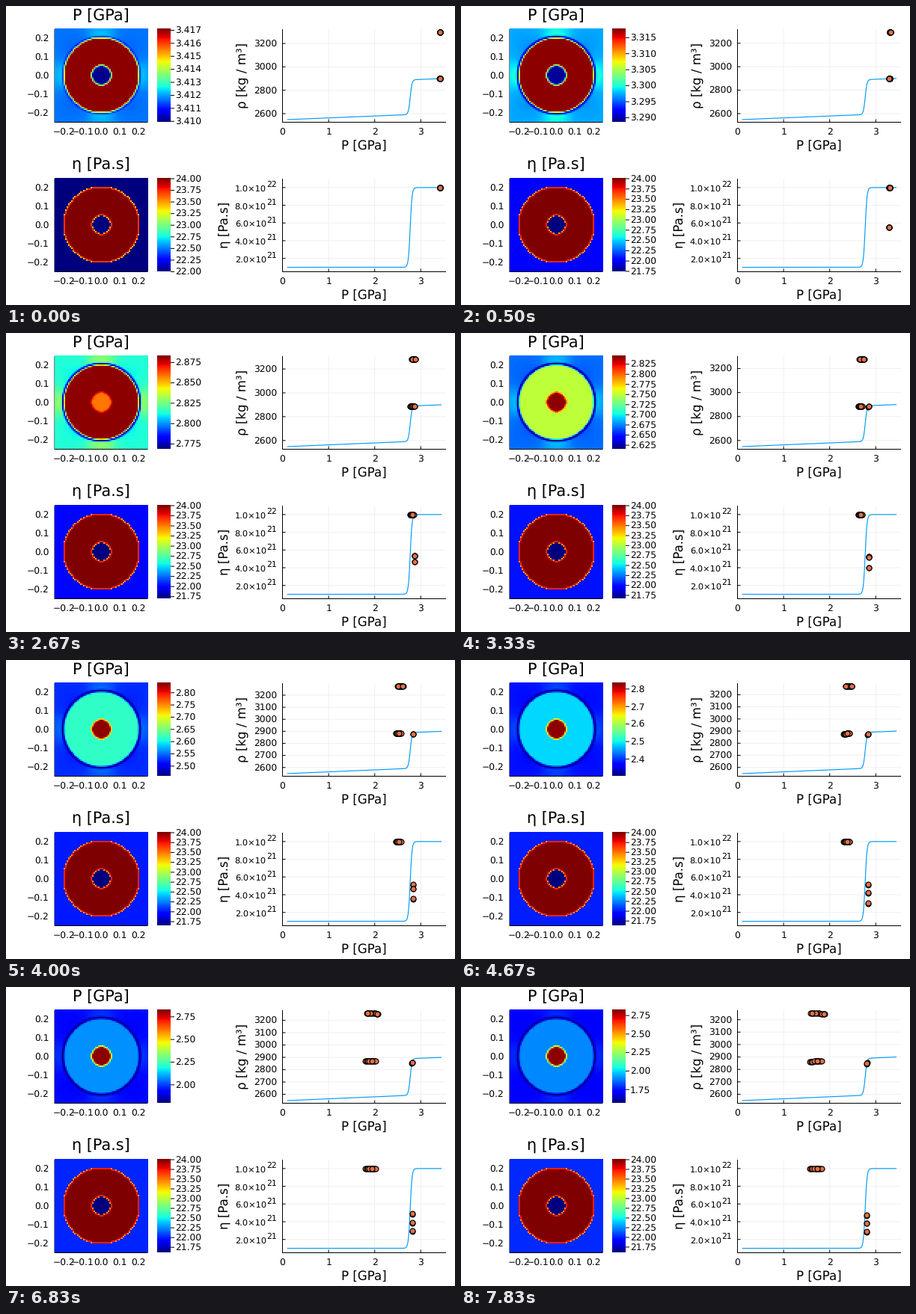
Write a matplotlib script that moves like this. It is 600x400 px and loops after 8 s.

```python
import math
import numpy as np
import matplotlib
import matplotlib.pyplot as plt
from matplotlib.animation import FuncAnimation

matplotlib.rcParams["font.family"] = "DejaVu Sans"
matplotlib.rcParams["text.hinting"] = "none"

W, H = 600, 400
STEPS, SUB = 48, 5              # simulation steps, drawn frames per step
PX = 0.72                       # points per pixel at 100 dpi
SIDE = 124.5                    # panel height
TICK, GUIDE, TITLE = 12.2, 16.6, 20.8
BLUE, ORANGE, GRID = "#009afa", "#e26f46", "#f0f0f0"

# Values over time, in GPa unless noted
KEYS = [0, 3, 11, 20, 28, 36, 47]
P_MIN = [3.40993, 3.2886, 2.9605, 2.615, 2.302, 1.99, 1.565]
P_RING = [3.41700, 3.3173, 3.0480, 2.748, 2.481, 2.225, 1.89]
P_MATRIX = [3.41170, 3.2973, 2.996, 2.67, 2.38, 2.11, 1.73]
LOBE = [0.0004, 0.0022, 0.010, 0.014, 0.021, 0.029, 0.038]
RIM = [0.4, 0.9, 0.8, 1, 1, 1, 1]
RING_LOW = [0.4, 0.4, 0.4, 0.22, 0.2, 0.12, 0.06]
CORE_KEYS = [0, 3, 11, 13, 15, 20, 28, 36, 47]
P_CORE = [3.41002, 3.2893, 2.967, 2.893, 2.862, 2.842, 2.827, 2.814, 2.807]
ETA_MIN = [21.74, 21.74, 21.74, 21.665, 21.63, 21.615, 21.605]   # log10
ETA_CORE = [                                                       # 1e21 Pa.s
    [5.5, 5.5, 5.5, 5.25, 5.18, 5.0, 4.78],
    [5.5, 5.5, 5.5, 5.18, 4.25, 4.0, 3.87],
    [5.5, 5.5, 5.5, 4.0, 3.1, 3.0, 2.9],
]

# Grid geometry
N = 62
CELL = 0.5 / N
mid = (np.arange(N) + 0.5) * CELL - 0.25
X, Y = np.meshgrid(mid, mid)
R = np.hypot(X, Y)


def cover(radius):
    """Share of each cell's four corners that lie inside a circle."""
    offs = (-CELL / 2, CELL / 2)
    return sum(np.hypot(X + a, Y + b) < radius for a in offs for b in offs) / 4


OUTER, INNER = cover(0.2), cover(0.05)
quad = np.cos(4 * np.arctan2(Y, X)) * (0.2 / R) ** 3
PATTERN = np.where(quad > 0, 1.6 * quad, 0.5 * quad)
DIP = np.exp(-((R - 0.206) / 0.006) ** 2)
ORDER = np.random.default_rng(4).permutation(15)


def at(k, vals, keys=KEYS):
    return float(np.interp(k, keys, vals))


def jump(p):
    return 0.5 * (1 + np.tanh((p - 2.77) / 0.04))


def density(p):
    s = jump(p)
    return (1 - s) * (2547.5 + 16 * p) + s * (2848 + 15 * p)


def px(p):
    return 369.5 + 61.6 * np.asarray(p)


def eta_y(v):
    return 355.5 - (np.asarray(v) - 0.5) * SIDE / 10.5


fig = plt.figure(figsize=(W / 100, H / 100), dpi=100, facecolor="white")
ax = fig.add_axes([0, 0, 1, 1])
ax.set_axis_off()
moving = []
CURVE_P = np.linspace(0.1, 3.45, 300)


def text(x, y, s, size=TICK, ha="center", **kw):
    return ax.text(x, y, s, fontsize=size * PX, ha=ha, va="baseline", color="black", **kw)


def line(xs, ys, color="black", width=1.0, z=3):
    return ax.plot(xs, ys, color=color, lw=width * PX, zorder=z,
                   solid_capstyle="butt", snap=False)[0]


def picture(data, x0, x1, top):
    im = ax.imshow(data, extent=[x0, x1, top + SIDE, top], cmap="jet", origin="upper",
                   interpolation="nearest", aspect="auto", zorder=2)
    im.set_clim(0, 1)
    return im


def side_label(x, y, s):
    return text(x, y + 4.6, s, ha="right")


def y_tick(y):
    return [line([369.5, 588], [y, y], GRID, z=1), line([369.5, 373.5], [y, y])]


def draw_static():
    maps = []
    for top, title in ((31, "P [GPa]"), (231, "η [Pa.s]")):
        bottom = top + SIDE
        text(127.2, top - 12, title, TITLE)
        # map panel
        line([65, 65, 189.5], [top, bottom, bottom], z=1)
        maps.append(picture(np.zeros((N, N)), 65, 189.5, top))
        picture(np.linspace(1, 0, 248)[:, None], 202, 220, top)
        for i in range(-2, 3):
            s = f"{i / 10:.1f}".replace("-", "\u2212")
            text(127.2 + 24.8 * i, top + 141.4, s)
            side_label(57.5, top + SIDE / 2 - 24.8 * i, s)
        # curve panel
        line([369.5, 369.5], [top, bottom + 0.5])
        line([369, 588], [bottom, bottom])
        for i in range(4):
            x = px(i)
            text(x, top + 141.4, str(i))
            if i:
                line([x, x], [top, bottom], GRID, z=1)
                line([x, x], [bottom - 4, bottom])
        text(478.5, top + 161.8, "P [GPa]", GUIDE)
    for x, y, s in ((321.3, 93, "ρ [kg / m³]"), (297, 293, "η [Pa.s]")):
        text(x, y, s, GUIDE, rotation=90, rotation_mode="anchor")
    for v in (2, 4, 6, 8, 10):
        y = float(eta_y(v))
        y_tick(y)
        mantissa, power = (1, 22) if v == 10 else (v, 21)
        text(347.8, y + 5, f"{mantissa}.0×10", 11.4, ha="right")
        text(361.6, y - 0.6, str(power), 10.8, ha="right")
    line(px(CURVE_P), eta_y(1 + 9 * jump(CURVE_P)), BLUE, 1.15, 4)
    return maps


def nice_step(span):
    e = math.floor(math.log10(span)) - 2
    steps = [m * 10.0 ** (e + j) for j in range(4) for m in (1, 2.5, 5)]
    return next(s for s in steps if span / s <= 10)


def bar_ticks(lo, hi, top):
    step = nice_step(hi - lo)
    digits = next(d for d in range(6) if abs(round(step, d) - step) < 1e-9)
    for i in range(math.ceil(lo / step - 1e-6), math.floor(hi / step + 1e-6) + 1):
        v = i * step
        y = top + SIDE * (hi - v) / (hi - lo)
        moving.append(line([220, 225], [y, y]))
        moving.append(text(226, y + 4.6, f"{v:.{digits}f}", ha="left"))


def dots(xs, ys):
    xs = np.atleast_1d(xs)
    ys = np.broadcast_to(ys, xs.shape)
    moving.append(ax.plot(xs, ys, "o", ms=6.9 * PX, mfc=ORANGE, mec="black",
                          mew=1.15 * PX, zorder=6, snap=False)[0])


def draw(frame):
    # a step begins one drawn frame early, so it is up when its time comes
    k = min((frame + 1) // SUB, STEPS - 1)
    while moving:
        moving.pop().remove()

    lo, ring, matrix = at(k, P_MIN), at(k, P_RING), at(k, P_MATRIX)
    core, lobe = at(k, P_CORE, CORE_KEYS), at(k, LOBE)
    peak = max(ring, core)
    hi = peak + 0.012 * (peak - lo)

    # pressure map
    field = (1 - OUTER) * (matrix + lobe * PATTERN) + (OUTER - INNER) * ring + INNER * core
    field = field - at(k, RIM) * DIP * (field - lo)
    p_map.set_data((field - lo) / (hi - lo))
    bar_ticks(lo, hi, 31)

    # viscosity map
    e_lo = at(k, ETA_MIN) if k else 22.0
    eta = (1 - OUTER) * 1e22 + (OUTER - INNER) * 1e24 + INNER * 10 ** e_lo
    e_map.set_data((np.log10(eta) - e_lo) / (24 - e_lo))
    bar_ticks(e_lo, 24.0, 231)

    # density panel
    ring_lo = lo + at(k, RING_LOW) * (ring - lo)
    rho_hi = 3300 - 24.4 * (3.414 - ring_lo)
    base = density(0.1)
    pad = 0.03 * (rho_hi - base)

    def rho_y(r):
        return 155.5 - (np.asarray(r) - base + pad) / (rho_hi - base + 2 * pad) * SIDE

    for v in range(2600, 3201, 100 if rho_hi < 3279 else 200):
        y = float(rho_y(v))
        moving.extend(y_tick(y))
        moving.append(side_label(361.8, y, str(v)))
    moving.append(line(px(CURVE_P), rho_y(density(CURVE_P)), BLUE, 1.15, 4))

    frac = ORDER / 14
    p_ring = ring_lo + np.append(frac, [0.1, 0.95]) * (ring - ring_lo)
    tilt = 0.18 * k * (p_ring - ring_lo) / (ring - ring_lo)
    dots(px(p_ring), rho_y(rho_hi - tilt))

    p_mat = np.append(lo + frac * (matrix + 2.4 * lobe - lo), matrix)
    dots(px(p_mat), rho_y(2900 - 20 * (3.414 - p_mat)))
    p_in = core + np.array([-0.003, 0.003, 0.0])
    dots(px(p_in), rho_y(density(p_in)))

    # viscosity panel
    dots(px(p_mat), eta_y(10))
    for vals in ETA_CORE:
        v = at(k, vals) if k else 10
        dots(px([core, core]), eta_y([v - 0.08 * (k > 20), v]))

    return moving


def reset():
    return draw(0)


p_map, e_map = draw_static()
ax.set_xlim(0, W)
ax.set_ylim(H, 0)
ax.set_autoscale_on(False)

anim = FuncAnimation(fig, draw, frames=STEPS * SUB, init_func=reset,
                     interval=8000 / (STEPS * SUB), repeat=True, repeat_delay=0,
                     blit=False)
plt.show()
```
